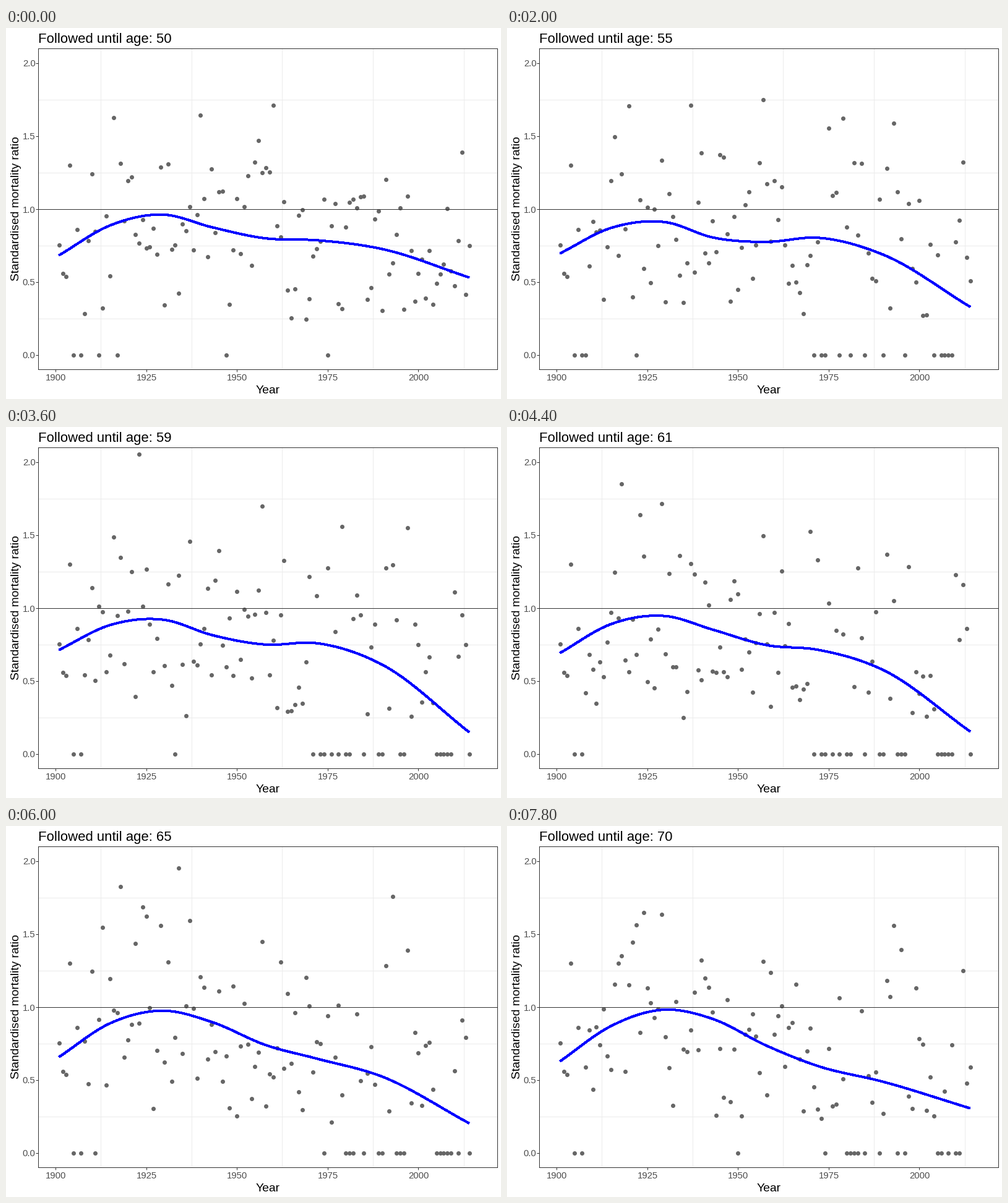
Recreate the animation shown at these times as a matplotlib script. Size 800 by 600 pixels, loop 8000 ms.

```python
import numpy as np
import matplotlib.pyplot as plt
from matplotlib.animation import FuncAnimation

W, H, DPI = 800, 600, 100
FRAMES, STEP = 40, 200
FIRST_AGE, LAST_AGE = 50, 70
PX = 72 / DPI  # points per pixel
FONT = "Liberation Sans"
DARK, GRID = "#333333", "#EBEBEB"

YEARS = np.arange(1901, 2015)
AGES = np.arange(FIRST_AGE, LAST_AGE + 1)

# Trend line: a few key years (columns) at a few key frames (rows).
KEY_YEARS = np.array([1901, 1915, 1930, 1943, 1958, 1972, 1990, 2014])
KEY_FRAMES = [0, 6, 14, 26, 39]
TREND = np.array([
    [.684, .888, .962, .877, .800, .787, .727, .532],
    [.659, .865, .928, .833, .797, .803, .727, .515],
    [.735, .877, .894, .780, .755, .805, .650, .146],
    [.672, .897, .972, .890, .742, .670, .540, .159],
    [.629, .870, .983, .920, .735, .597, .489, .307]])

# The earliest years hardly change with age.
STEADY = [.755, .56, .54, 1.3, 0, .86, 0]


def smooth(rows, x):
    """Cubic Hermite curves through the key years."""
    i = np.searchsorted(KEY_YEARS[1:-1], x, side="right")
    gap = np.diff(KEY_YEARS)[i]
    t = (x - KEY_YEARS[i]) / gap
    m = np.gradient(rows, KEY_YEARS, axis=1)
    return ((1 + 2 * t) * (1 - t) ** 2 * rows[:, i]
            + t * (1 - t) ** 2 * gap * m[:, i]
            + t ** 2 * (3 - 2 * t) * rows[:, i + 1]
            + t ** 2 * (t - 1) * gap * m[:, i + 1])


def tween(at, keys, rows):
    """Linear change of every column between key times."""
    return np.array([np.interp(at, keys, col) for col in rows.T]).T


def ratios(trend):
    """Scatter per age: slowly wandering ratios, with spells of no deaths."""
    rng = np.random.default_rng(12)
    n = len(YEARS)
    z = rng.normal(0, 1, n)
    luck, drift = rng.random(n), rng.uniform(-0.02, 0.02, n)
    rows = []
    for k, age in enumerate(AGES):
        rise = np.interp(age, [50, 56, 64, 70], [0, 0.9, 1, 0.6])
        share = 0.02 + rise * (0.25 * (YEARS >= 1970) + 0.55 * (YEARS >= 2005))
        level = trend[k] / (1 - share)
        row = 0.22 + abs(level + 0.4 * z - 0.22)
        row[(luck + drift * k) % 1 < share] = 0
        row[:len(STEADY)] = STEADY
        rows.append(row)
        z = 0.85 * z + np.sqrt(1 - 0.85 ** 2) * rng.normal(0, 1, n)
    return np.array(rows)


frames = np.arange(FRAMES)
age_keys = np.round((AGES - FIRST_AGE) * (FRAMES - 1) / (LAST_AGE - FIRST_AGE))
lines = tween(frames, KEY_FRAMES, smooth(TREND, YEARS))
dots = tween(frames, age_keys, ratios(lines[age_keys.astype(int)]))
dots[dots > 2.07] = np.nan

fig = plt.figure(figsize=(W / DPI, H / DPI), dpi=DPI, facecolor="white")
LEFT, RIGHT, TOP, BOTTOM = 52, 794, 33, 552
ZERO, UNIT = 529, 236  # pixel row of ratio 0, pixels per ratio of 1
ax = fig.add_axes([LEFT / W, 1 - BOTTOM / H,
                   (RIGHT - LEFT) / W, (BOTTOM - TOP) / H])
ax.set(xlim=(1895.25, 2021.75),
       ylim=((ZERO - BOTTOM) / UNIT, (ZERO - TOP) / UNIT))
ax.set_xticks(range(1900, 2001, 25), labels=[])
ax.set_yticks(np.arange(0, 2.1, 0.5), labels=[])
ax.tick_params(length=4 * PX, width=PX, color=DARK)
for side in ax.spines.values():
    side.set(color=DARK, linewidth=PX)

for x in np.arange(1912.5, 2015, 25):
    ax.axvline(x, color=GRID, lw=PX, zorder=0)
for y in np.arange(0.25, 2, 0.5):
    ax.axhline(y, color=GRID, lw=PX, zorder=0)


def put(x, y, text, size, color="black", **kw):
    return fig.text(x / W, 1 - y / H, text, family=FONT, size=size * PX,
                    color=color, va="baseline", **kw)


for k in range(5):
    put(80.3 + 146.65 * k, 570, str(1900 + 25 * k), 14.9, "#4D4D4D",
        ha="center")
    put(47.5, 534.5 - 118 * k, f"{k / 2:.1f}", 14.9, "#4D4D4D", ha="right")
put(423, 591, "Year", 19.25, ha="center")
put(21, 292, "Standardised mortality ratio", 19.25, ha="center",
    rotation=90, rotation_mode="anchor")
title = put(52, 24, "", 22.2, ha="left")

points, = ax.plot([], [], "o", ms=7 * PX, mfc="#666666", mew=0, zorder=2)
ax.axhline(1, color=DARK, lw=PX, zorder=3)
curve, = ax.plot([], [], color="#0000FF", lw=3 * PX, zorder=4,
                 solid_capstyle="butt", antialiased=False)


def draw(i):
    age = FIRST_AGE + round((LAST_AGE - FIRST_AGE) * i / (FRAMES - 1))
    title.set_text(f"Followed until age: {age}")
    points.set_data(YEARS, dots[i])
    curve.set_data(YEARS, lines[i])
    return title, points, curve


anim = FuncAnimation(fig, draw, frames=FRAMES, interval=STEP,
                     repeat=True, repeat_delay=0)
plt.show()
```
